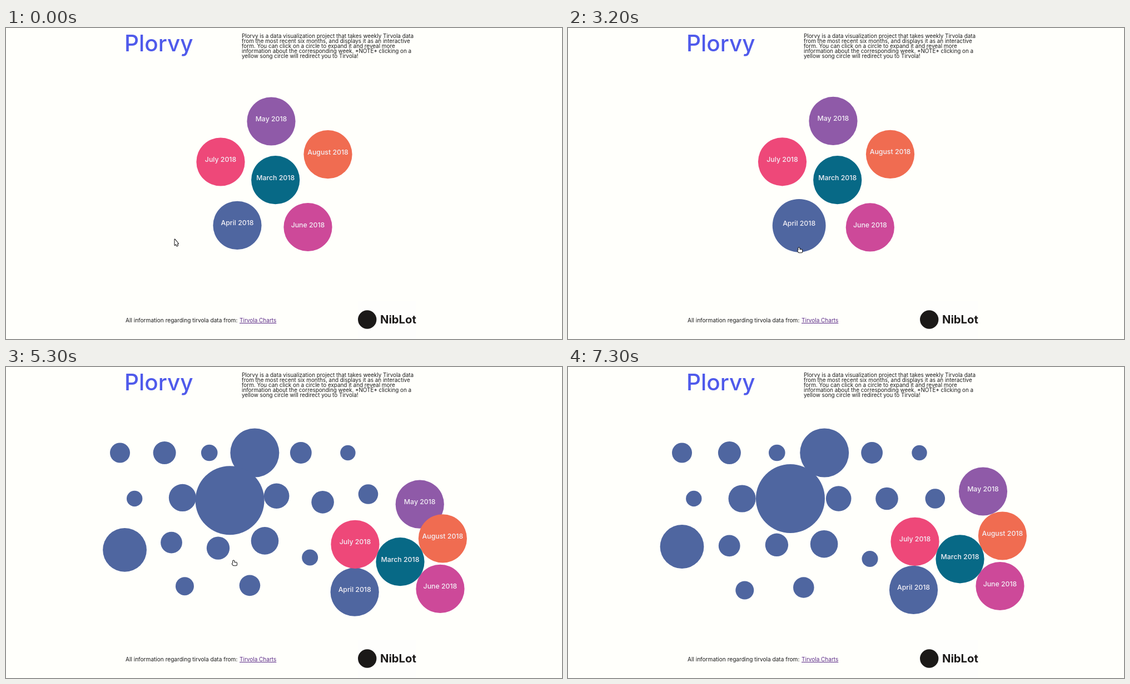
These frames come from a looping animation (1000 by 560 pixels, 7400 ms). An HTML page with a canvas:

```html
<!DOCTYPE html>
<html lang="en">
<head>
<meta charset="utf-8">
<title>Plorvy</title>
<style>
  html, body { margin: 0; width: 100%; height: 100%; overflow: hidden; background: #fffffb; }
  canvas { display: block; }
</style>
</head>
<body>
<canvas id="stage" width="1000" height="560"></canvas>
<script>
const ctx = document.getElementById('stage').getContext('2d');
const LOOP = 7400, STEP = 100;
const CLICK = 4250, OPEN = 4800, END = 7300;
const BLUE = '#4f66a0', INK = '#1c1c1c', MONTH_RADIUS = 43.6;

// Each month has a place before the click and one it settles in afterwards.
const months = [
  { name: 'April', color: BLUE, rest: [416, 355.4], home: [621.5, 401.4] },
  { name: 'May', color: '#8f5aa8', rest: [477, 168], home: [746.5, 224] },
  { name: 'June', color: '#cd4999', rest: [543, 358.5], home: [777, 394.5] },
  { name: 'July', color: '#ee4879', rest: [386, 241], home: [624, 314.4] },
  { name: 'August', color: '#f06c51', rest: [579, 227.6], home: [781.4, 304] },
  { name: 'March', color: '#076986', rest: [484.7, 273.7], home: [705, 345.8] }
];
const march = months[5];

// Artists settle in rows; "off" is how far a bubble still is from its place at OPEN.
const flip = col => col % 2 ? -1 : 1;
const rows = [
  { at: [205, 154.5], gap: [85.4, 0], radii: [18, 20.5, 14.8, 44, 19.4, 13.7],
    off: col => [-28 * Math.sin(col * Math.PI / 10), 0] },
  { at: [226.3, 237], gap: [86.8, 0], radii: [14.2, 24.6, 62, 22.8, 20.3, 17.8],
    off: col => [8 - .9 * col * col, 2.6 * col * flip(col)] },
  { at: [205, 323.5], gap: [85.2, -1.6], radii: [39.4, 19.4, 20.7, 24.8],
    off: col => [14 - 2 * col, 9.5 * flip(col)] },
  { at: [543, 345.5], gap: [0, 0], radii: [14.5], off: () => [6, -4] },
  { at: [317.8, 402], gap: [106, -5], radii: [16.5, 18.8],
    off: col => [6 + 18 * col, 6 * col - 12] }
];
const artists = rows.flatMap(({ at, gap, radii, off }) => radii.map((r, col) => ({
  r, off: off(col), home: [at[0] + gap[0] * col, at[1] + gap[1] * col]
})));
const star = artists.find(a => a.r === 62);

const pointerStops = [
  { t: 1150, x: 306, y: 386.5 }, { t: 2100, x: 425, y: 381 }, { t: 2950, x: 418, y: 402 },
  { t: 4100, x: 411, y: 386 }, { t: 4900, x: 411, y: 386 }, { t: 5800, x: 411, y: 307 },
  { t: 6400, x: 407, y: 291 }
];

const mix = (a, b, u) => a + (b - a) * u;
const span = (t, from, to) => Math.min(1, Math.max(0, (t - from) / (to - from)));
const smooth = u => u * u * (3 - 2 * u);
const easeOut = u => 1 - (1 - u) ** 3;
const pulse = (t, on, off) => smooth(span(t, on, on + 200)) * (1 - smooth(span(t, off, off + 200)));

// Share of the settling motion still to come: 1 at OPEN, 0 at END.
function unsettled(t) {
  const decay = ms => Math.exp(-ms / 1200), last = decay(END - OPEN);
  return (decay(Math.max(0, t - OPEN)) - last) / (1 - last);
}

// Before the click the ring slowly widens; afterwards a packed cluster loosens.
function monthAt({ rest, home }, t) {
  const u = easeOut(span(t, CLICK, OPEN)), left = unsettled(t);
  const widen = 1 + .007 * span(t, 0, CLICK);
  const dx = home[0] - march.home[0], dy = home[1] - march.home[1];
  const pack = mix(1, Math.min(1, 97 / Math.hypot(dx, dy)), left);
  const x = march.home[0] + dx * pack + 6.5 * left;
  const y = march.home[1] + dy * pack + 8 * left;
  return [
    mix(mix(march.rest[0], rest[0], widen), x, u),
    mix(mix(march.rest[1], rest[1], widen), y, u) + 26 * Math.sin(Math.PI * u)
  ];
}

function artistAt({ home, off }, t) {
  const u = mix(.35, 1, easeOut(span(t, CLICK, OPEN))), left = unsettled(t);
  return [mix(400, home[0] + off[0] * left, u), mix(265, home[1] + off[1] * left, u)];
}

function disc(x, y, r, color) {
  ctx.fillStyle = color;
  ctx.beginPath();
  ctx.arc(x, y, r, 0, 2 * Math.PI);
  ctx.fill();
}

function text(str, x, y, size, color, weight = 400, align = 'left') {
  ctx.font = `${weight} ${size}px Inter, sans-serif`;
  ctx.textAlign = align;
  ctx.fillStyle = color;
  ctx.fillText(str, x, y);
}

function drawPage() {
  ctx.globalAlpha = 1;
  ctx.fillStyle = '#fffffb';
  ctx.fillRect(0, 0, 1000, 560);
  text('Plorvy', 213, 42, 40.5, '#4f5aeb', 500);
  [
    'Plorvy is a data visualization project that takes weekly Tirvola data',
    'from the most recent six months, and displays it as an interactive',
    'form. You can click on a circle to expand it and reveal more',
    'information about the corresponding week. *NOTE* clicking on a',
    'yellow song circle will redirect you to Tirvola!'
  ].forEach((line, i) => text(line, 424, 17.5 + 9 * i, 9.9, INK));

  text('All information regarding tirvola data from:', 215, 530, 10.1, INK);
  text('Tirvola Charts', 420, 530, 10, '#5b2a86');
  ctx.fillRect(420, 531, ctx.measureText('Tirvola Charts').width, 1);

  ctx.fillStyle = '#fefefc';
  ctx.fillRect(633, 492, 105, 68);
  disc(649.7, 525, 16.7, '#1b1918');
  text('NibLot', 673, 532, 20.2, '#1b1918', 700);
}

function arrowPath() {
  const path = new Path2D();
  [[-2.5, -6], [-2.5, 4.5], [-.3, 2.6], [1.4, 6], [3, 5.2], [1.5, 2], [4, 1.8]]
    .forEach(([x, y]) => path.lineTo(x, y));
  path.closePath();
  return path;
}

function handPath() {
  const path = new Path2D();
  path.roundRect(-2.8, -1, 6.8, 5.2, 1.2);
  path.roundRect(-2.8, -4.6, 2.2, 6, 1);
  path.roundRect(-4, .2, 3, 2.2, 1);
  return path;
}

const arrow = arrowPath(), hand = handPath();

function drawPointer(t) {
  const last = pointerStops.length - 1;
  const next = pointerStops.findIndex(p => p.t > t);
  const b = pointerStops[next < 0 ? last : next];
  const a = pointerStops[next < 0 ? last : Math.max(0, next - 1)];
  const u = a === b ? 0 : smooth(span(t, a.t, b.t));
  const shape = t < 1600 ? arrow : hand;
  ctx.save();
  ctx.translate(mix(a.x, b.x, u), mix(a.y, b.y, u));
  ctx.strokeStyle = '#111';
  ctx.fillStyle = '#fff';
  ctx.lineWidth = 2;
  ctx.lineJoin = 'round';
  ctx.stroke(shape);
  ctx.fill(shape);
  ctx.restore();
}

function draw(t) {
  drawPage();
  const opened = t > CLICK;
  const starHover = pulse(t, 5800, 7100), aprilHover = pulse(t, 1550, 5000);

  ctx.globalAlpha = 1 - .5 * starHover;
  if (opened) {
    artists.filter(a => a !== star).forEach(a => disc(...artistAt(a, t), a.r, BLUE));
  }
  months.forEach(m => {
    const [x, y] = monthAt(m, t);
    const grow = m.name === 'April' ? 4.3 * aprilHover : 0;
    disc(x, y, MONTH_RADIUS + grow, m.color);
    text(m.name + ' 2018', x, y, 12.3, '#f3f0f6', 500, 'center');
  });

  ctx.globalAlpha = 1;
  if (opened) {
    const [x, y] = artistAt(star, t);
    disc(x, y, star.r + 10.5 * starHover, BLUE);
    if (t >= 5800 && t < 7200) {
      text('The Wandor', x, y - 3, 12.3, '#f0f2f8', 400, 'center');
      text('136,468,029', x, y + 9.3, 12.3, '#f0f2f8', 400, 'center');
    }
  }
  if (t < 7200) drawPointer(t);
}

const start = performance.now();
function tick() {
  const t = (performance.now() - start) % LOOP;
  draw(Math.floor(t / STEP) * STEP);
  requestAnimationFrame(tick);
}
tick();
</script>
</body>
</html>
```
